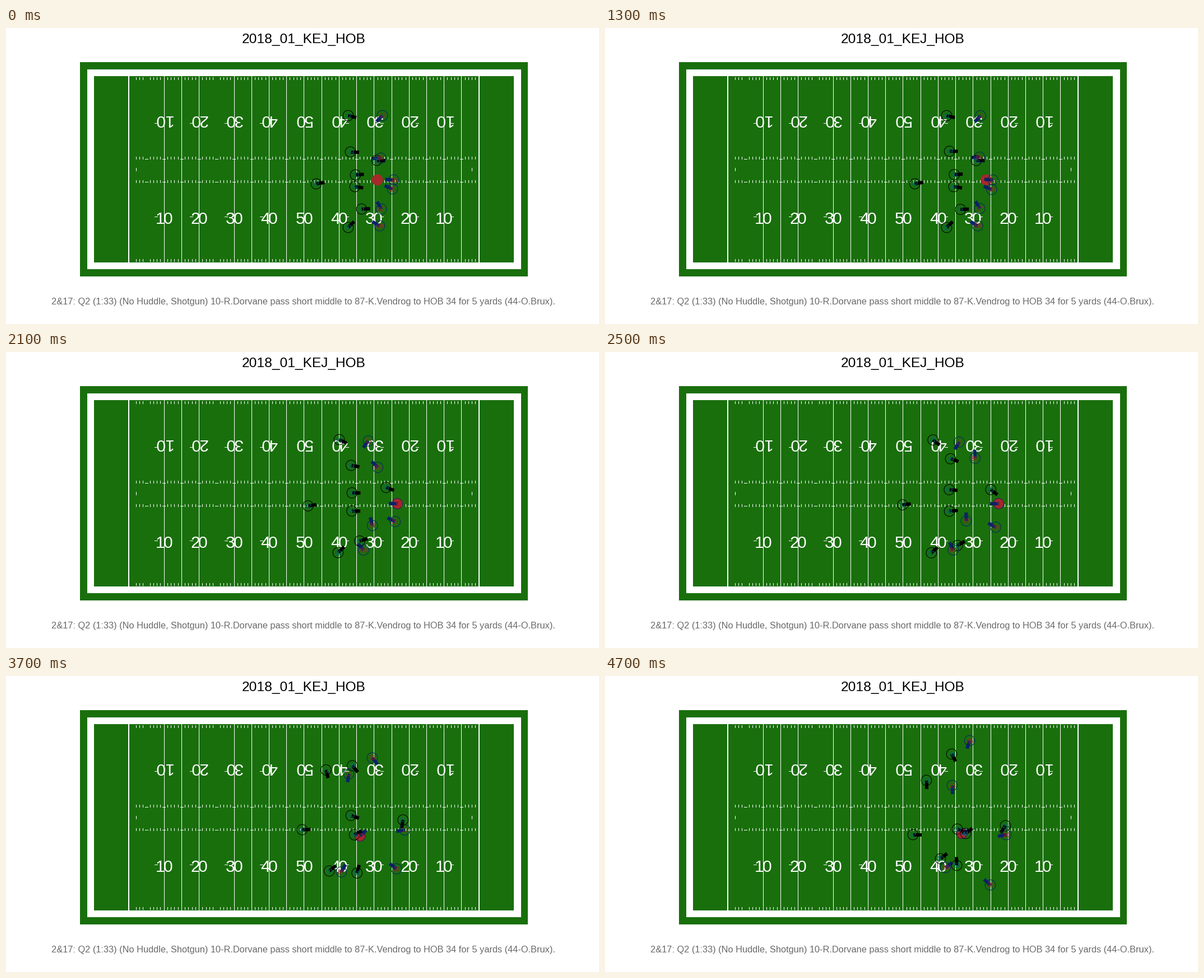
Animation, 1058 px wide and 529 px high, one loop 4.8 s. Source, as a matplotlib script:

```python
import numpy as np
import matplotlib
matplotlib.rcParams["toolbar"] = "None"
import matplotlib.pyplot as plt
from matplotlib.animation import FuncAnimation
from matplotlib.patches import Circle, Rectangle

W, H, DPI = 1058, 529, 100
FRAMES, STEP = 48, 100
PX = 72 / DPI
FONT = "Liberation Sans"
GRASS, BALL = "#196f0c", "#a52a2a"
DEFENCE = "#000000", "#006778"
OFFENCE = "#0b2265", "#a71930"

YARD = 6.245                        # pixels per yard
LEFT, TOP = 157, 86                 # corner of the field
RIGHT, BOTTOM = LEFT + 120 * YARD, TOP + 53.3 * YARD
REACH = 15                          # length of a facing bar

SNAP, CUT, END = 12, 32, 47         # frames that shape every route
THROW, CATCH = 30, 36

fig = plt.figure(figsize=(W / DPI, H / DPI), dpi=DPI, facecolor="white")
ax = fig.add_axes([0, 0, 1, 1])
ax.set_xlim(0, W)
ax.set_ylim(H, 0)
ax.axis("off")


def label(x, y, s, size, color, **kw):
    return ax.text(x, y, s, fontsize=size * PX, color=color, family=FONT,
                   ha="center", **kw)


def box(margin, color):
    m = margin * YARD
    ax.add_patch(Rectangle((LEFT - m, TOP - m), RIGHT - LEFT + 2 * m,
                           BOTTOM - TOP + 2 * m, color=color, lw=0,
                           antialiased=False, zorder=0))


def yard_x(n):
    return LEFT + (n + 10) * YARD


# The small offsets keep hairlines in one pixel when they are snapped.
def vert(n, y0, y1, width=1):
    x = int(yard_x(n) + 0.2) + 0.2
    ax.vlines(x, y0, y1, color="white", lw=width * PX, antialiased=False,
              zorder=1)


def dash(x, y):
    ax.hlines(y + 0.8, x - 2.5, x + 2.5, color="white", lw=PX,
              antialiased=False, zorder=1)


def yard_number(n):
    x = yard_x(n)
    for digit, side in zip(str(min(n, 100 - n)), (-7, 7)):
        label(x + side, 349.5, digit, 30, "white", zorder=2)
        label(x - side, 155.5, digit, 30, "white", zorder=2, rotation=180,
              rotation_mode="anchor")
    if n != 50:
        for y in (169, 336):
            dash(x + 14 * np.sign(n - 50), y)


def draw_field():
    for margin, color in ((4, GRASS), (2, "white"), (0, GRASS)):
        box(margin, color)
    for n in (0, 100):
        vert(n, TOP, BOTTOM, 2)
    for n in range(2, 100):
        if n % 5:
            for y in (88, 230, 272, 413):
                vert(n, y, y + 4)
            continue
        if n not in (5, 25):
            vert(n, TOP, BOTTOM)
        for y in (233, 274):
            dash(yard_x(n), y)
        if n % 10 == 0:
            yard_number(n)
    for n in (2, 98):
        vert(n, 250, 255)


def route(start, cut, end):
    """Wait for the snap, speed up towards the cut, bend on to the end."""
    start, cut, end = (np.array(p, float) for p in (start, cut, end))
    d1, d2 = CUT - SNAP, END - CUT
    v1, v2 = (cut - start) / d1, (end - cut) / d2
    v0, vc = 0.4 * v1, (v1 * d2 + v2 * d1) / (d1 + d2)
    t = np.arange(FRAMES)[:, None]
    u = np.clip((t - SNAP) / d1, 0, 1)
    w = np.clip((t - CUT) / d2, 0, 1)
    first = (start + (cut - start) * u * u * (3 - 2 * u)
             + d1 * u * (1 - u) * (v0 * (1 - u) - vc * u))
    second = cut + vc * d2 * w + (v2 - vc) * d2 * w * w
    return np.where(t < CUT, first, second)


def turn(a, b):
    u = np.clip((np.arange(FRAMES) - SNAP) / (END - SNAP), 0, 1)
    return np.radians(a + (b - a) * u * u * (3 - 2 * u))


class Player:
    def __init__(self, number, colors, start, cut, end, facing):
        edge, ink = colors
        self.path, self.angle = route(start, cut, end) + 0.5, turn(*facing)
        self.bar, = ax.plot([], [], color=edge, lw=6 * PX,
                            solid_capstyle="butt", zorder=5)
        self.ring = ax.add_patch(Circle((0, 0), 9.3, fill=False, ec=edge,
                                        lw=PX, zorder=6))
        self.tag = label(0, 0, str(number), 11.5, ink, va="center_baseline",
                         zorder=7)

    def place(self, i):
        (x, y), a = self.path[i], self.angle[i]
        self.bar.set_data([x, x + REACH * np.cos(a)],
                          [y, y - REACH * np.sin(a)])
        self.ring.center = x, y
        self.tag.set_position((x, y))


draw_field()
label(531, 26.5, "2018_01_KEJ_HOB", 24.5, "black")
label(530.5, 494, "2&17: Q2 (1:33) (No Huddle, Shotgun) 10-R.Dorvane pass "
      "short middle to 87-K.Vendrog to HOB 34 for 5 yards (44-O.Brux).",
      16.4, "#696969")

# start, cut, end, then first and last facing in degrees
passer = Player(10, OFFENCE, (691, 271), (708, 272), (715, 283), (176, 192))
catcher = Player(87, OFFENCE, (669, 323), (633, 290), (636, 281), (120, 25))
players = [
    Player(21, DEFENCE, (610, 156), (573, 161), (573, 186), (-14, -90)),
    Player(39, DEFENCE, (614, 221), (617, 171), (618, 139), (0, -62)),
    Player(25, DEFENCE, (661, 236), (702, 252), (714, 267), (0, -124)),
    Player(50, DEFENCE, (623, 262), (612, 243), (628, 273), (4, -25)),
    Player(44, DEFENCE, (622, 283), (615, 284), (643, 281), (-9, 38)),
    Player(42, DEFENCE, (553, 278), (524, 272), (549, 283), (10, 0)),
    Player(51, DEFENCE, (634, 323), (626, 353), (627, 338), (2, 92)),
    Player(20, DEFENCE, (610, 356), (573, 355), (598, 326), (45, 38)),
    Player(13, OFFENCE, (671, 156), (614, 167), (619, 195), (-134, -90)),
    Player(85, OFFENCE, (668, 232), (655, 162), (650, 115), (184, -108)),
    Player(26, OFFENCE, (689, 287), (698, 331), (687, 373), (158, 138)),
    Player(88, OFFENCE, (666, 353), (601, 352), (607, 342), (150, 38)),
    passer, catcher,
]
ball = ax.add_patch(Circle((0, 0), 10, color=BALL, lw=0, zorder=4))
SPOT = np.array([662.5, 271.5])


def ball_at(i):
    snapped = np.clip((i - SNAP + 2) / 5, 0, 1)
    thrown = np.clip((i - THROW) / (CATCH - THROW), 0, 1)
    held = SPOT + (passer.path[i] - SPOT) * snapped
    return held + (catcher.path[i] - held) * thrown


def draw(i):
    ball.center = ball_at(i)
    for p in players:
        p.place(i)
    return []


anim = FuncAnimation(fig, draw, frames=FRAMES, interval=STEP,
                     init_func=lambda: draw(0), repeat=True, repeat_delay=0)
plt.show()
```
